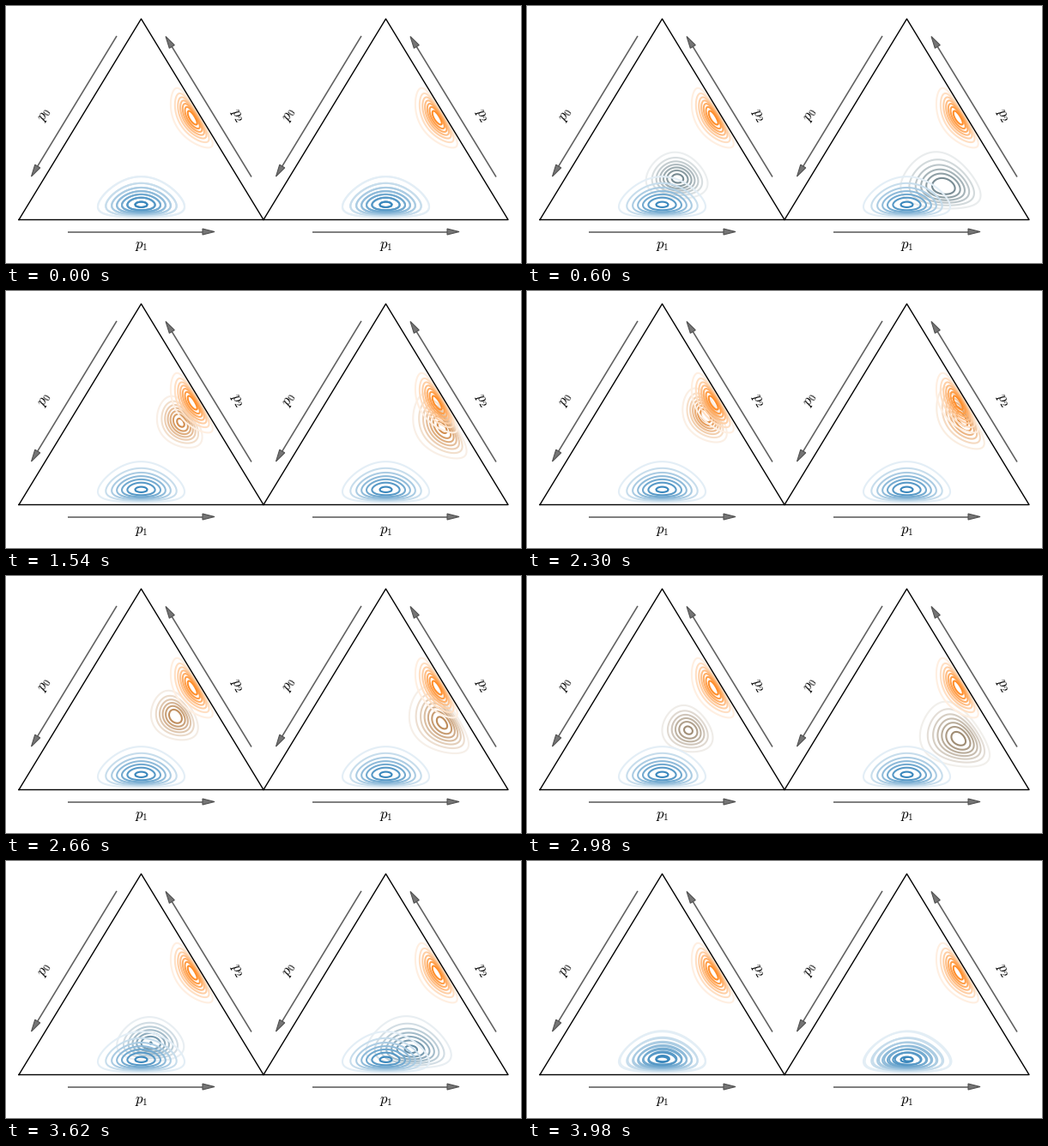
A matplotlib script that plays this animation: 600 by 300 pixels, repeating every 4000 ms.

```python
from math import exp, lgamma, log

import matplotlib.pyplot as plt
import numpy as np
from matplotlib.animation import FuncAnimation
from matplotlib.ticker import MaxNLocator

plt.rcParams["mathtext.fontset"] = "cm"

W, H = 600, 300
FRAMES, INTERVAL = 200, 20
SIDE, TOP, BASE = 285, 15, 249.5
LEFTS = (15, 300)

BLUE = np.array([31, 119, 180]) / 255
ORANGE = np.array([255, 127, 14]) / 255

# Dirichlet exponents (alpha - 1) for p0, p1, p2
START = np.array([12.65, 12.65, 2.05])
END = np.array([1.62, 20.3, 22.6])

# Barycentric grid that follows the triangle's edges
s, p2 = np.meshgrid(np.linspace(0, 1, 131), np.linspace(0, 1, 131))
p1 = (1 - p2) * s
p0 = (1 - p2) * (1 - s)
GX = SIDE * (p1 + p2 / 2)
GY = BASE - (BASE - TOP) * p2
LOGS = [np.log(np.maximum(p, 1e-12)) for p in (p0, p1, p2)]
LOCATOR = MaxNLocator(8, min_n_ticks=1)


def density(a):
    """Dirichlet density on the grid and its peak value."""
    norm = lgamma(a.sum() + 3) - sum(lgamma(v + 1) for v in a)
    z = np.exp(norm + sum(v * g for v, g in zip(a, LOGS)))
    peak = exp(norm + sum(v * log(v / a.sum()) for v in a))
    return z, peak


def rings(ax, left, a, color, zorder):
    z, peak = density(a)
    ticks = LOCATOR.tick_values(0, peak)
    top = ticks[ticks >= peak][0]
    levels = ticks[(ticks > 1e-9) & (ticks < peak)]
    colors = [1 - (1 - color) * v / top for v in levels]
    return ax.contour(GX + left, GY, z, levels=levels, colors=colors,
                      linewidths=1.5, zorder=zorder)


def straight(t):
    """The mode moves on a line while the density tightens midway."""
    n0, n1 = START.sum(), END.sum()
    mode = (1 - t) * START / n0 + t * END / n1
    total = (1 - t) * n0 + t * n1 + 4 * t * (1 - t) * (18.3 + 10 * t**3)
    return mode * total


def curved(t):
    """Geometric interpolation of the exponents."""
    return START ** (1 - t) * END ** t


def arrow(ax, tail, tip, length=14, half=3.5):
    tail, tip = np.array(tail, float), np.array(tip, float)
    d = (tip - tail) / np.hypot(*(tip - tail))
    n = np.array([-d[1], d[0]])
    neck = tip - length * d
    ax.plot(*zip(tail, neck), color="#606060", lw=1.15,
            solid_capstyle="butt", zorder=4)
    ax.fill(*zip(tip, neck + half * n, neck - half * n), fc="#757575",
            ec="#505050", lw=0.8, zorder=4)


def panel(ax, x):
    ax.plot([x, x + SIDE, x + SIDE / 2, x], [BASE, BASE, TOP, BASE],
            color="black", lw=1, solid_joinstyle="round", zorder=3)
    arrow(ax, (x + 114, 35), (x + 14.5, 199))
    arrow(ax, (x + 57, 263.5), (x + 228, 263.5))
    arrow(ax, (x + 271, 199.5), (x + 171, 35.5))
    for i, (dx, y, turn) in enumerate([(29.5, 126, 59), (143, 279, 0),
                                       (254.5, 127, -59)]):
        ax.text(x + dx, y, f"$p_{i}$", size=12, rotation=turn,
                ha="center", va="center", zorder=5)
    rings(ax, x, START, BLUE, 2)
    rings(ax, x, END, ORANGE, 2)


fig = plt.figure(figsize=(W / 100, H / 100), dpi=100, facecolor="white")
ax = fig.add_axes([0, 0, 1, 1])
ax.set_autoscale_on(False)
ax.axis("off")
for x in LEFTS:
    panel(ax, x)
ax.set_xlim(0, W)
ax.set_ylim(H, 0)

moving = []


def update(k):
    while moving:
        moving.pop().remove()
    half = FRAMES / 2
    t = 1 - abs(1 - k / half)
    color = (1 - t) * BLUE + t * ORANGE
    for x, path in zip(LEFTS, (straight, curved)):
        moving.append(rings(ax, x, path(t), color, 1))
    ax.set_xlim(0, W)
    ax.set_ylim(H, 0)
    return []


anim = FuncAnimation(fig, update, frames=FRAMES, interval=INTERVAL,
                     init_func=lambda: [], repeat=True, repeat_delay=0)
plt.show()
```
